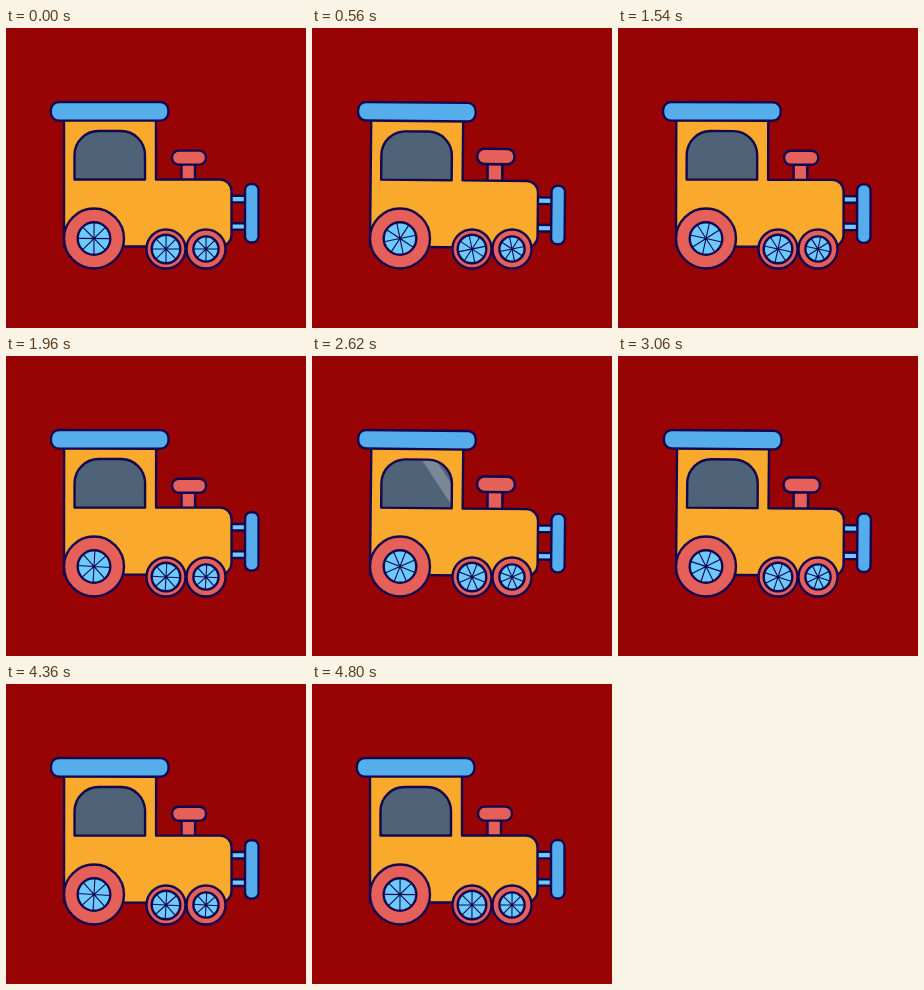
These frames come from a looping animation (300x300 px, 4820 ms). An HTML page:

```html
<!DOCTYPE html>
<html lang="en">
<head>
<meta charset="utf-8">
<title>Toy train</title>
<style>
html, body { margin: 0; width: 100%; height: 100%; overflow: hidden; background: #980404; }
svg { display: block; width: 100vw; height: 100vh; }
.line { stroke: #14064f; stroke-width: 2.4; stroke-linejoin: round; }
.yellow { fill: #f9a92c; }
.blue { fill: #56adec; }
.sky { fill: #6ccafc; }
.red { fill: #e46058; }
.spokes { stroke: #14064f; stroke-width: 1.1; fill: none; }
</style>
</head>
<body>
<svg viewBox="0 0 300 300">
  <clipPath id="pane"><path d="M68.5 151.5V127A24 24 0 0 1 92.5 103H115A24 24 0 0 1 139 127V151.5Z"/></clipPath>
  <g id="body">
    <g class="line">
      <rect class="sky" x="222" y="167.8" width="20" height="6.6"/>
      <rect class="sky" x="222" y="195.2" width="20" height="6.6"/>
      <rect class="blue" x="239" y="156" width="13.5" height="58.5" rx="6"/>
      <g id="chimney" class="red">
        <rect x="175.5" y="134" width="13.5" height="19"/>
        <rect x="166" y="122.6" width="34" height="14" rx="6.6"/>
      </g>
      <path class="yellow" d="M58 88H150V151.5H214A11.5 11.5 0 0 1 225.5 163V207A11.5 11.5 0 0 1 214 218.5H58Z"/>
      <rect class="blue" x="44.8" y="74" width="117.6" height="18.6" rx="8"/>
    </g>
    <g clip-path="url(#pane)">
      <rect x="66" y="100" width="76" height="54" fill="#4f6378"/>
      <path id="glint" d="M0 103H14L47 152H33Z" fill="#7a8897"/>
    </g>
    <path class="line" fill="none" d="M68.5 151.5V127A24 24 0 0 1 92.5 103H115A24 24 0 0 1 139 127V151.5Z"/>
  </g>
  <g id="wheels"></g>
</svg>
<script>
const LOOP = 4820, TURN = 1200, ROCK = 400;
const $ = id => document.getElementById(id);
const set = (el, value) => el.setAttribute('transform', value);

// x, y, tyre radius, hub radius
const wheels = [[88, 210.5, 30, 16.3], [160, 221, 19.5, 14.3], [200, 221, 19.5, 12.6]];

function spokes(r) {
  let d = '';
  for (let i = 0; i < 4; i++) {
    const x = r * Math.cos(i * Math.PI / 4), y = r * Math.sin(i * Math.PI / 4);
    d += `M${-x} ${-y}L${x} ${y}`;
  }
  return d;
}

$('wheels').innerHTML = wheels.map(([x, y, tyre, hub]) => `
  <g transform="translate(${x} ${y})">
    <circle class="line red" r="${tyre}"/>
    <circle class="line sky" r="${hub}"/>
    <path class="spokes" d="${spokes(hub)}"/>
  </g>`).join('');
const spinners = document.querySelectorAll('.spokes');

function draw(t) {
  const turn = t % TURN;
  const rock = (1 - Math.cos(2 * Math.PI * t / ROCK)) / 2;
  const puff = 1 + 0.12 * rock * rock;
  set($('body'), `rotate(${0.6 * rock} 58 218)`);
  set($('chimney'), `translate(182.7 152) scale(${puff}) translate(-182.7 -152)`);
  set($('glint'), `translate(${20 + 0.4 * turn} 0)`);
  spinners.forEach(s => set(s, `rotate(${360 * turn / TURN})`));
}

const start = performance.now();
function tick() {
  draw((performance.now() - start) % LOOP);
  requestAnimationFrame(tick);
}
draw(0);
requestAnimationFrame(tick);
</script>
</body>
</html>
```
